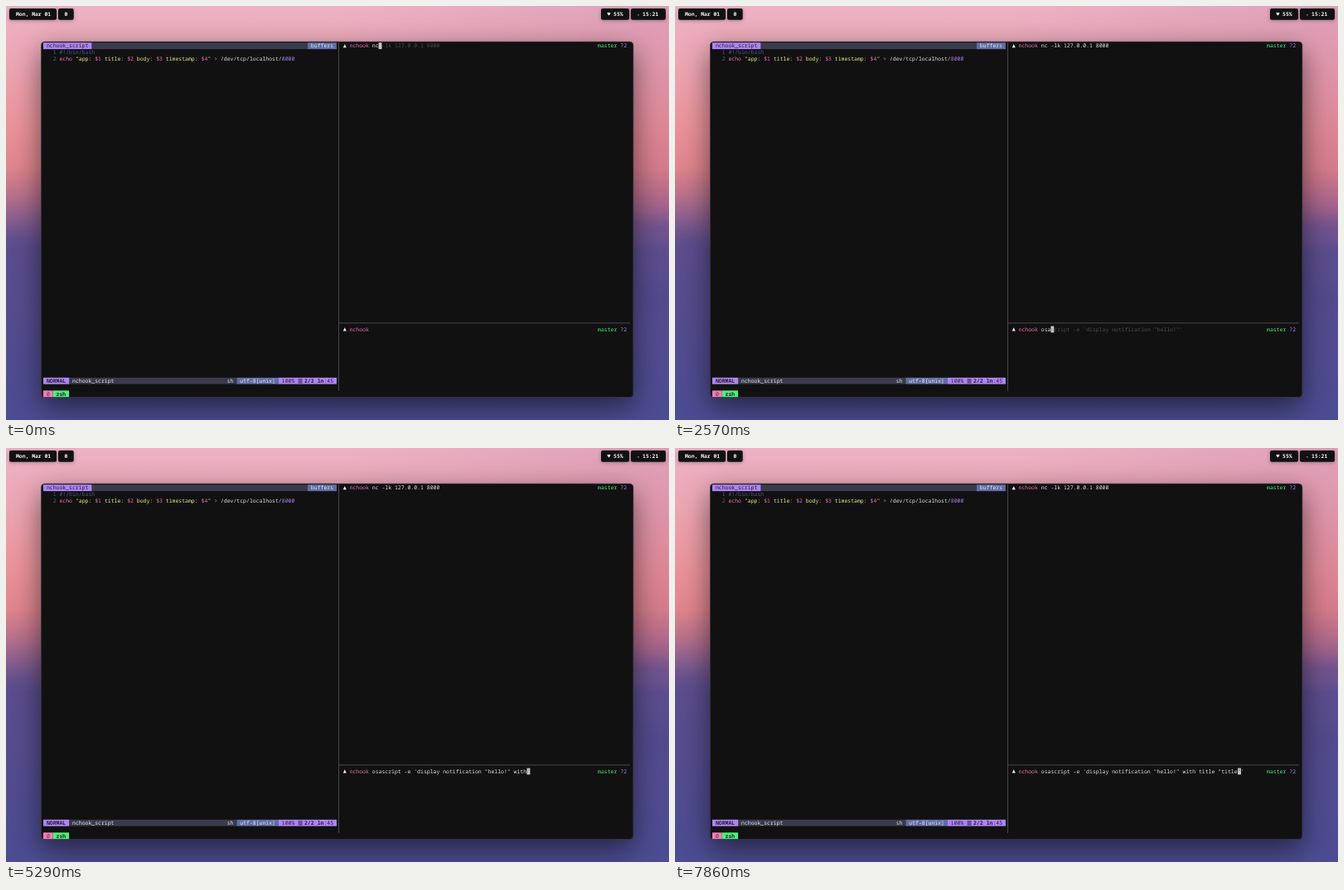
Recreate the animation shown at these times as an HTML page with a canvas. Size 800x500 px, loop 8000 ms.

```html
<!DOCTYPE html>
<html lang="en">
<head>
<meta charset="utf-8">
<title>Terminal session</title>
<style>
html, body { margin: 0; width: 100%; height: 100%; overflow: hidden; background: #4c4a8c; }
canvas { display: block; width: 800px; height: 500px; }
</style>
</head>
<body>
<canvas id="stage" width="800" height="500"></canvas>
<script>
const LOOP = 8000;
const CELL = 3.89, ROW = 7.78, LEFT = 45, TOP = 44.3;
const PROMPT_COL = 93, INPUT_COL = 102, LOWER_ROW = 44;
const FONT = '"Noto Sans Mono", "DejaVu Sans Mono", monospace';
const C = {
  term: '#111112', white: '#e4e4e2', pink: '#ec70b4', purple: '#b083f3', green: '#50ee7b',
  yellow: '#e6ee88', slate: '#5f6da4', bar: '#393b4d', dark: '#22222e', comment: '#505a80',
  hint: '#4b4b4d', cursor: '#c6c6c8'
};

const stage = document.getElementById('stage').getContext('2d');
const colX = col => LEFT + col * CELL;
const rowY = row => TOP + row * ROW;

function put(ctx, str, x, y, color, weight = 400, size = 6.48) {
  ctx.font = `${weight} ${size}px ${FONT}`;
  ctx.textRendering = 'geometricPrecision';
  ctx.textBaseline = 'alphabetic';
  ctx.fillStyle = color;
  ctx.fillText(str, x, y);
}

function cells(ctx, str, col, row, color, weight) {
  put(ctx, str, colX(col), rowY(row) + 6.1, color, weight);
}

function block(ctx, col, row, count, color) {
  ctx.fillStyle = color;
  ctx.fillRect(colX(col), rowY(row), count * CELL, ROW);
}

// Runs of [text, color] laid out on one row.
function runs(ctx, col, row, list) {
  for (const [str, color] of list) {
    cells(ctx, str, col, row, color);
    col += str.length;
  }
}

function roundBox(ctx, x, y, w, h, r, color) {
  ctx.fillStyle = color;
  ctx.beginPath();
  ctx.roundRect(x, y, w, h, r);
  ctx.fill();
}

function gradient(ctx, x0, y0, x1, y1, stops) {
  const g = ctx.createLinearGradient(x0, y0, x1, y1);
  for (const [at, color] of stops) g.addColorStop(at, color);
  return g;
}

function cloud(ctx, x, y, rx, ry, rgb, alpha) {
  ctx.save();
  ctx.translate(x, y);
  ctx.scale(rx, ry);
  const g = ctx.createRadialGradient(0, 0, 0, 0, 0, 1);
  g.addColorStop(0, `rgba(${rgb},${alpha})`);
  g.addColorStop(1, `rgba(${rgb},0)`);
  ctx.fillStyle = g;
  ctx.fillRect(-1, -1, 2, 2);
  ctx.restore();
}

function drawSky(ctx) {
  ctx.fillStyle = gradient(ctx, 0, 0, 0, 500, [
    [0, '#edb2c4'], [0.14, '#eda6b4'], [0.3, '#ea9298'], [0.39, '#e0858d'],
    [0.46, '#b8708c'], [0.53, '#7c5a8e'], [0.59, '#5d4d8e'], [0.7, '#544c8e'], [1, '#4c4c92']
  ]);
  ctx.fillRect(0, 0, 800, 500);
  ctx.fillStyle = gradient(ctx, 400, 0, 800, 0, [[0, 'rgba(150,70,130,0)'], [1, 'rgba(150,70,130,.16)']]);
  ctx.fillRect(0, 0, 800, 270);
  cloud(ctx, 12, 285, 50, 22, '84,74,140', 0.4);
  cloud(ctx, 20, 362, 60, 30, '96,76,140', 0.35);
  cloud(ctx, 785, 268, 60, 20, '92,76,144', 0.35);
  cloud(ctx, 785, 355, 60, 30, '78,68,138', 0.3);
}

function pill(ctx, x, w, label, textX) {
  ctx.save();
  ctx.shadowColor = 'rgba(0,0,0,.3)';
  ctx.shadowBlur = 4;
  ctx.shadowOffsetY = 1;
  roundBox(ctx, x, 3, w, 13.7, 2, C.term);
  ctx.restore();
  put(ctx, label, textX, 12, '#f0f0f0', 600, 6.4);
}

function drawMenu(ctx) {
  pill(ctx, 4, 57, 'Mon, Mar 01', 12);
  pill(ctx, 63, 18.7, '0', 70.4);
  pill(ctx, 718, 34, '♥ 55%', 725.4);
  pill(ctx, 754, 42, '→ 15:21', 760.4);
}

function drawWindow(ctx) {
  ctx.save();
  ctx.shadowColor = 'rgba(0,0,0,.55)';
  ctx.shadowBlur = 34;
  ctx.shadowOffsetY = 11;
  roundBox(ctx, 42.3, 43, 714.7, 429.7, 4.5, C.term);
  ctx.restore();
  ctx.strokeStyle = '#403c46';
  ctx.lineWidth = 0.7;
  ctx.beginPath();
  ctx.roundRect(42.5, 43.2, 714.3, 429.3, 4.5);
  ctx.stroke();
  ctx.fillStyle = '#55555a';
  ctx.fillRect(401, 44, 0.8, 421);
  ctx.fillRect(401, 382.5, 352, 0.8);
}

function drawEditor(ctx) {
  block(ctx, 0, 0, 91, C.bar);
  block(ctx, 0, 0, 15, C.purple);
  block(ctx, 82, 0, 9, C.slate);
  cells(ctx, 'nchook_script', 1, 0, C.dark);
  cells(ctx, 'buffers', 83, 0, C.white);

  runs(ctx, 3, 1, [['1 ', C.comment], ['#!/bin/bash', C.comment]]);
  cells(ctx, '2', 3, 2, C.comment);
  runs(ctx, 5, 2, [
    ['echo ', C.pink], ['"app: ', C.yellow], ['$1', C.pink], [' title: ', C.yellow],
    ['$2', C.pink], [' body: ', C.yellow], ['$3', C.pink], [' timestamp: ', C.yellow],
    ['$4', C.pink], ['" ', C.yellow], ['> ', C.pink], ['/dev/tcp/localhost/', C.white],
    ['8000', C.purple]
  ]);

  const row = 52;
  block(ctx, 0, row, 60, C.bar);
  block(ctx, 0, row, 8, C.purple);
  block(ctx, 60, row, 13, C.slate);
  block(ctx, 73, row, 18, C.purple);
  cells(ctx, 'NORMAL', 1, row, C.dark, 700);
  cells(ctx, 'nchook_script', 9, row, C.white);
  cells(ctx, 'sh', 57, row, C.white);
  cells(ctx, 'utf-8[unix]', 61, row, C.white);
  cells(ctx, '100%', 74, row, C.dark);
  ctx.fillStyle = C.dark;
  for (let i = 0; i < 3; i++) ctx.fillRect(352.6, rowY(row) + 1.6 + i * 2, 5, 1);
  cells(ctx, '2/2', 81, row, C.dark, 700);
  cells(ctx, 'ln', 85, row, C.dark, 700);
  cells(ctx, ':45', 87, row, C.dark);
}

function drawTabs(ctx) {
  block(ctx, 0, 54, 3, '#f27cb4');
  block(ctx, 3, 54, 5, C.green);
  cells(ctx, '0', 1, 54, '#57304a');
  cells(ctx, 'zsh', 4, 54, C.dark, 600);
}

function drawPrompt(ctx, row) {
  const x = colX(PROMPT_COL), y = rowY(row);
  ctx.fillStyle = '#f0f0f0';
  ctx.beginPath();
  ctx.moveTo(x, y + 6);
  ctx.lineTo(x + 2, y + 1.6);
  ctx.lineTo(x + 4, y + 6);
  ctx.fill();
  cells(ctx, 'nchook', 95, row, C.pink);
  cells(ctx, 'master', 172, row, C.green);
  cells(ctx, '?2', 179, row, C.purple);
}

const NC = 'nc -lk 127.0.0.1 8000';
const NOTE = 'osascript -e \'display notification "hello!"\'';
const BODY = NOTE.slice(0, -1);

// Each step: [time, line, caret column, typed length]
const step = (time, line, caret, typed = line.length) => ({ time, line, caret, typed });

const upper = [step(0, NC, 2, 2), step(140, NC, 3, 3), step(290, NC, 4, 4), step(430, NC, 5, 5), step(570, NC, 21)];
const lower = [step(0, '', 0)];

[2290, 2430, 2570, 2710].forEach((t, i) => lower.push(step(t, NOTE, i + 1, i + 1)));
[9, 12, 21, 34, 44].forEach((n, i) => lower.push(step([3000, 3140, 3290, 3570, 3710][i], NOTE, n, n)));
lower.push(step(4290, NOTE, 43));

const TAIL = ' with title ';
[4570, 4710, 5000, 5140, 5290, 5430, 5570, 5710, 5860, 6000, 6140, 6290].forEach((t, i) =>
  lower.push(step(t, BODY + TAIL.slice(0, i + 1) + "'", 44 + i)));

lower.push(step(6570, BODY + TAIL + '"\'', 56));
lower.push(step(6710, BODY + TAIL + '""\'', 57));
lower.push(step(7000, BODY + TAIL + '""\'', 56));
[7290, 7430, 7570, 7710, 7860].forEach((t, i) =>
  lower.push(step(t, BODY + TAIL + '"' + 'title'.slice(0, i + 1) + '"\'', 57 + i)));

const stateAt = (steps, t) => steps.findLast(s => s.time <= t);

function drawInput(state, row, focused) {
  const { line, caret, typed } = state;
  cells(stage, line.slice(0, typed), INPUT_COL, row, C.white);
  cells(stage, line.slice(typed), INPUT_COL + typed, row, C.hint);
  if (!focused) return;
  block(stage, INPUT_COL + caret, row, 1, C.cursor);
  if (caret < line.length) cells(stage, line[caret], INPUT_COL + caret, row, typed <= caret ? '#a8a8aa' : '#55555a');
}

function drawPointer(t) {
  if (t < 1000 || t >= 2140) return;
  const frame = Math.floor((t - 1000) / 142.8);
  const left = Math.pow(1 - Math.min(1, frame / 5), 2);
  const x = 503 + 46 * left, y = 417 - 95 * left;
  const beam = (color, width) => {
    stage.strokeStyle = color;
    stage.lineWidth = width;
    stage.beginPath();
    stage.moveTo(x - 2.6, y - 4.3);
    stage.quadraticCurveTo(x, y - 4.3, x, y - 2);
    stage.lineTo(x, y + 2);
    stage.quadraticCurveTo(x, y + 4.3, x - 2.6, y + 4.3);
    stage.moveTo(x + 2.6, y - 4.3);
    stage.quadraticCurveTo(x, y - 4.3, x, y - 2);
    stage.moveTo(x, y + 2);
    stage.quadraticCurveTo(x, y + 4.3, x + 2.6, y + 4.3);
    stage.moveTo(x - 1.5, y + 1.5);
    stage.lineTo(x + 1.5, y + 1.5);
    stage.stroke();
  };
  stage.lineCap = 'round';
  beam('#e8e8e8', 2.4);
  beam('#151515', 0.8);
}

const backdrop = document.createElement('canvas');
backdrop.width = 800;
backdrop.height = 500;
const back = backdrop.getContext('2d');
for (const draw of [drawSky, drawMenu, drawWindow, drawEditor, drawTabs]) draw(back);
drawPrompt(back, 0);
drawPrompt(back, LOWER_ROW);

function render(now) {
  const t = now % LOOP;
  const lowerFocus = t >= 1710;
  const running = t >= 710;
  stage.drawImage(backdrop, 0, 0);
  drawInput(stateAt(upper, t), 0, !running);
  if (running && !lowerFocus) block(stage, PROMPT_COL, 1, 1, C.cursor);
  drawInput(stateAt(lower, t), LOWER_ROW, lowerFocus);
  drawPointer(t);
}

const start = performance.now();
(function tick() {
  render(performance.now() - start);
  requestAnimationFrame(tick);
})();
</script>
</body>
</html>
```
